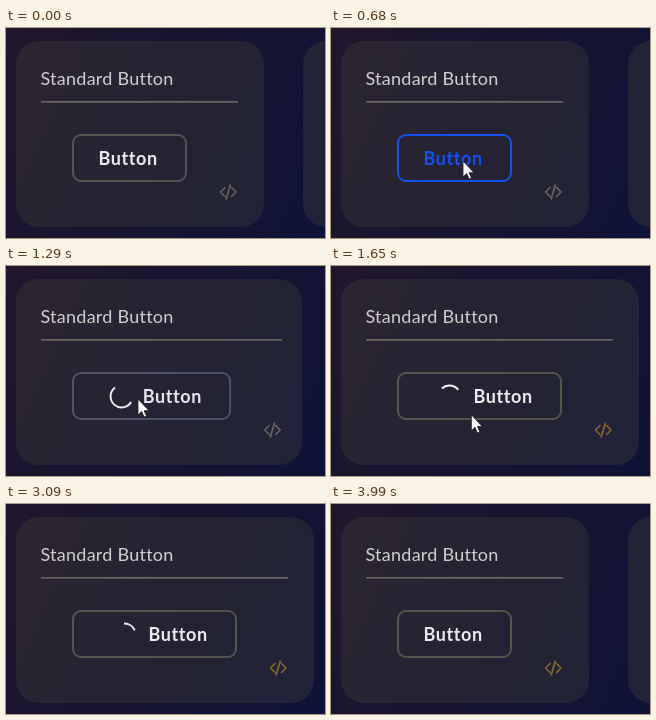
An HTML page that plays this animation: 319 px wide and 210 px high, repeating every 4.31 s.

```html
<!DOCTYPE html>
<html lang="en">
<head>
<meta charset="utf-8">
<title>Loading button</title>
<style>
  html, body { margin: 0; width: 100%; height: 100%; overflow: hidden; background: #17132f; }
  svg { display: block; width: 319px; height: 210px; }
  text { font-family: Lato, "Open Sans", sans-serif; font-size: 18px; }
  .card { fill: rgba(64, 64, 60, .36); }
  .title { fill: #d3d1d0; letter-spacing: .25px; }
  .label { font-weight: 700; letter-spacing: .6px; }
  .icon, #arc { fill: none; stroke-linecap: round; stroke-linejoin: round; }
  .icon { stroke-width: 1.7; }
  #arc { stroke: #eef2f6; stroke-width: 1.9; stroke-linecap: butt; }
  #cursor { fill: #fff; stroke: #1c1c22; stroke-width: .8; }
</style>
</head>
<body>
<svg viewBox="0 0 319 210">
  <defs>
    <linearGradient id="bg" gradientUnits="userSpaceOnUse" x1="0" y1="20" x2="310" y2="165">
      <stop offset="0" stop-color="#21172e"/>
      <stop offset=".45" stop-color="#17132f"/>
      <stop offset="1" stop-color="#0f1238"/>
    </linearGradient>
  </defs>
  <rect width="319" height="210" fill="url(#bg)"/>
  <rect id="card" class="card" x="10" y="13" width="248" height="186" rx="23"/>
  <rect id="next" class="card" x="297" y="13" width="248" height="186" rx="23"/>
  <text class="title" x="34.5" y="57">Standard Button</text>
  <rect id="rule" x="35" y="73" width="197" height="1.7" fill="#6a6764"/>
  <rect id="button" x="67" y="107" width="113" height="46" rx="8" fill="none" stroke-width="2"/>
  <path id="arc"/>
  <text id="label" class="label" y="137">Button</text>
  <path id="icon" class="icon" d="M219 159.5L214.5 164L219 168.5M224.3 157L220.2 171M225.5 159.5L230 164L225.5 168.5"/>
  <path id="cursor" d="M0 0V16l3.7-3.5 2.4 5.6 2.4-1-2.4-5.4H11z"/>
</svg>
<script>
const LOOP = 4310, SPIN = 1400;
const GRAY = [88, 84, 80], WHITE = [236, 236, 238], BLUE = [20, 82, 245];
const el = id => document.getElementById(id);
const set = (id, attrs) => {
  for (const k in attrs) el(id).setAttribute(k, attrs[k]);
};

const ramp = (t, a, b) => Math.min(1, Math.max(0, (t - a) / (b - a)));
const smooth = x => x * x * (3 - 2 * x);
const easeOut = x => 1 - (1 - x) ** 2;
const mix = (a, b, k) => a + (b - a) * k;
const blend = (a, b, k) => `rgb(${a.map((v, i) => Math.round(mix(v, b[i], k)))})`;
const along = (a, b, k) => [mix(a[0], b[0], k), mix(a[1], b[1], k)];

// Spinner cycle: [ms, tail angle, head angle], one full turn per cycle
const ARC = [
  [290, 267, 338], [350, 290, 350], [860, 337, 455], [1060, 340, 543],
  [1140, 342, 558], [1400, 425, 620], [1650, 585, 683], [1690, 627, 698]
];

function arcAngles(t) {
  const u = (t - 290 + SPIN) % SPIN + 290;
  const i = Math.max(1, ARC.findIndex(p => p[0] >= u));
  const [a, b] = [ARC[i - 1], ARC[i]];
  const k = ramp(u, a[0], b[0]);
  return [mix(a[1], b[1], k), mix(a[2], b[2], k)];
}

function arcPath(cx, cy, r, tail, head) {
  const at = deg => {
    const a = deg * Math.PI / 180;
    return `${cx + r * Math.cos(a)} ${cy + r * Math.sin(a)}`;
  };
  return `M${at(tail)}A${r} ${r} 0 ${head - tail > 180 ? 1 : 0} 1 ${at(head)}`;
}

function pointer(t) {
  const rest = [132, 133], pause = [152, 171];
  if (t < 1420) return along([256, 212], rest, easeOut(ramp(t, 140, 640)));
  if (t < 2590) return along(rest, pause, smooth(ramp(t, 1420, 1940)));
  return along(pause, [266, 212], smooth(ramp(t, 2590, 3080)));
}

function draw(t) {
  const size = 24 * (ramp(t, 1020, 1180) - ramp(t, 3835, 3985));
  const gap = 13 * (smooth(ramp(t, 1180, 1340)) - smooth(ramp(t, 3680, 3835)));
  const grow = size + 2 * gap;
  const cardGrow = t < 2000 ? 50 * ramp(t, 1135, 1340) : grow;

  set('card', { width: 248 + cardGrow });
  set('next', { x: 297 + grow });
  set('rule', { width: 197 + grow });
  set('icon', {
    transform: `translate(${grow} 0)`,
    stroke: t < 1400 ? '#6c655f' : '#8a6630'
  });

  const hover = smooth(ramp(t, 400, 670)) - ramp(t, 980, 1300);
  const fade = Math.max(0, hover);
  set('button', { width: 113 + grow, stroke: blend(GRAY, BLUE, t < 980 ? fade : Math.sqrt(fade)) });
  set('label', { x: 92.5 + grow, fill: blend(WHITE, BLUE, fade) });

  const scale = size / 24;
  set('arc', {
    d: size > .5 ? arcPath(93.5 + gap + size / 2, 130.5, 11 * scale, ...arcAngles(t)) : 'M0 0',
    visibility: size > .5 ? 'visible' : 'hidden'
  });

  const [x, y] = pointer(t);
  set('cursor', {
    transform: `translate(${x} ${y})`,
    visibility: t >= 165 && t < 3080 ? 'visible' : 'hidden'
  });
}

const start = performance.now();
function tick() {
  draw((performance.now() - start) % LOOP);
  requestAnimationFrame(tick);
}
tick();
</script>
</body>
</html>
```
